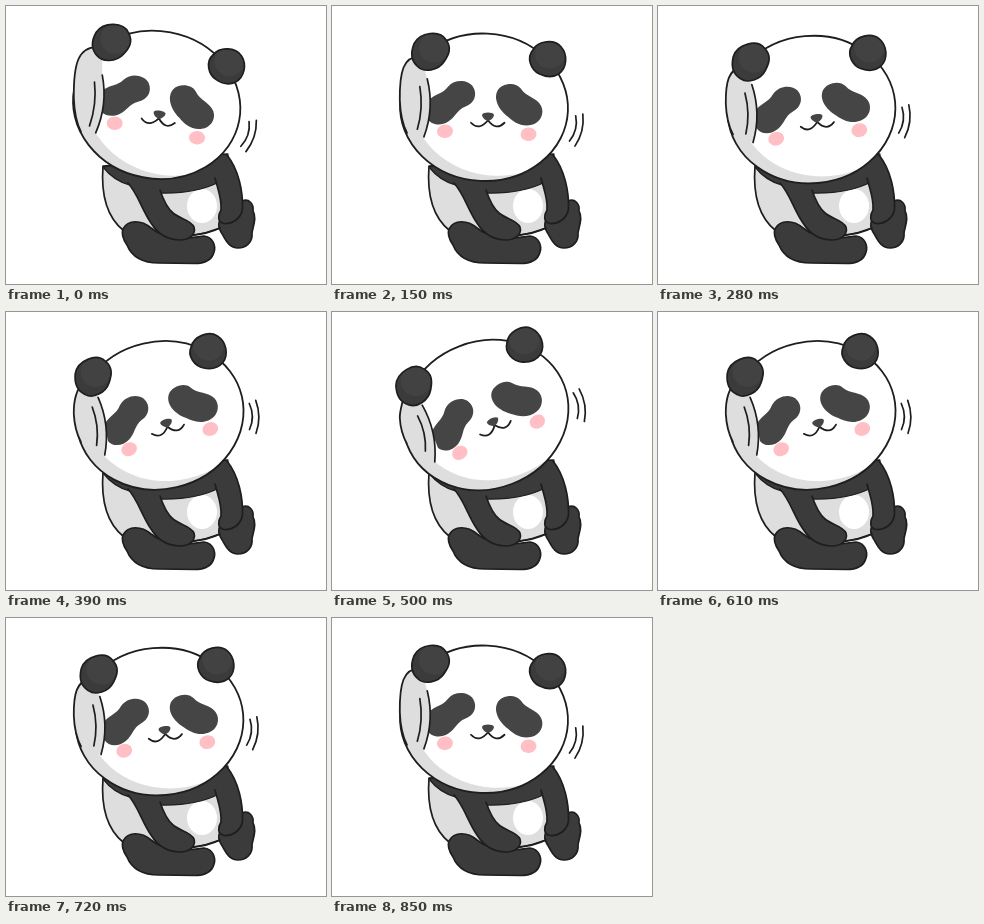
An HTML page with a canvas that plays this animation: 320 px wide and 278 px high, repeating every 1000 ms.

```html
<!DOCTYPE html>
<html lang="en">
<head>
<meta charset="utf-8">
<title>Panda</title>
<style>
  html, body { margin: 0; width: 100%; height: 100%; overflow: hidden; background: #fff; }
  canvas { display: block; width: 320px; height: 278px; }
</style>
</head>
<body>
<canvas id="stage"></canvas>
<script>
const canvas = document.getElementById('stage');
const ctx = canvas.getContext('2d');
const scale = window.devicePixelRatio || 1;
canvas.width = Math.round(320 * scale);
canvas.height = Math.round(278 * scale);

const INK = '#1e1e1e', DARK = '#3b3b3c', SHEEN = '#424243', PATCH = '#454546';
const GRAY = '#dedede', WHITE = '#fff', PINK = '#ffbfc4';
const PIVOT = { x: 160, y: 97 };
const LEFT_EAR = { x: 99, y: 44 };
const RAD = Math.PI / 180;

function paint(path, fill, line = 1.7) {
  if (fill) { ctx.fillStyle = fill; ctx.fill(path); }
  if (line) { ctx.strokeStyle = INK; ctx.lineWidth = line; ctx.stroke(path); }
}

function paintInside(shape, base, inner, color, line) {
  paint(shape, base, 0);
  ctx.save();
  ctx.clip(shape);
  paint(inner, color, 0);
  ctx.restore();
  paint(shape, null, line);
}

function oval(x, y, rx, ry, turn = 0) {
  const path = new Path2D();
  path.ellipse(x, y, rx, ry, turn, 0, Math.PI * 2);
  return path;
}

// Start, control and end of an upright bow bulging to the right, then turned.
function bowPoints(x, y, half, bulge, degrees) {
  const c = Math.cos(degrees * RAD), s = Math.sin(degrees * RAD);
  return [[0, -half], [bulge, 0], [0, half]]
    .map(([u, v]) => [x + c * u - s * v, y + s * u + c * v]);
}

function strokeBow(...shape) {
  const [from, control, to] = bowPoints(...shape);
  const path = new Path2D();
  path.moveTo(...from);
  path.quadraticCurveTo(...control, ...to);
  paint(path, null);
}

const torso = new Path2D('M97 160C95 186 99 210 118 225L150 232Q186 233 214 222L222 150Z');
const belly = oval(196, 200, 15, 17);
const chest = new Path2D('M97 161Q108 175 124 179L154 187Q190 188 213 176L222 148L160 150Z');
const rightFoot = new Path2D('M236 195C243 192 248 198 247 205C251 212 247 220 246 227C247 236 240 242 232 242C222 242 219 232 215 226C210 218 214 210 222 208Z');
const rightArm = new Path2D('M221 149C233 164 237 186 236.5 203C235 213 226 218 218 217.5C211 216 212 209 215 204C216 193 212 184 209 172');
const leftFoot = new Path2D('M117 223C122 213 136 214 145 222C158 233 180 233 198 230C207 231 210 240 208 246C206 254 198 257.500 188 257.500L153 257C134 257 125 249 121 239C117 233 115 228 117 223Z');
const leftArm = new Path2D('M122 177C132 188 136 204 145 217C152 228 162 234 174 234C184 234 190 228 188 221C185 214 174 213 167 207C160 201 157 193 154 184');
const lap = new Path2D('M186 229Q202 228 214 222');

const head = oval(152, 99.500, 84, 73.700, 0.05);
const face = oval(165, 94, 85, 74, 0.05);
const leftEar = new Path2D('M82 36C88 24 108 22 114 32C120 40 117 47 112 54C106 63 92 65 86 59C80 54 78 46 82 36Z');
const rightEar = new Path2D('M201 42C206 33 222 31 229 39C236 47 235 60 227 66C221 70 213 69 207 66C199 62 194 50 201 42Z');
const leftPatch = new Path2D('M116 79C123 71 136 72 141 79C146 87 142 96 133 99C125 102 124 109 116 114C108 119 98 117 95 110L96 93C103 86 111 86 116 79Z');
const rightPatch = new Path2D('M166 82C171 75 184 74 189 81C194 89 205 90 209 98C213 106 208 115 200 117C190 120 181 114 176 109C169 104 160 92 166 82Z');
const nose = new Path2D('M150 107C151 104 161 104 162 107C162 110 158 113 156 113C154 113 150 110 150 107Z');
const mouth = new Path2D('M139 115Q147 123.500 156 112.500Q164 123.500 172.500 115');

function drawBody() {
  paint(torso, GRAY);
  paint(belly, WHITE, 0);
  paint(chest, DARK, 1.3);
  paint(rightFoot, DARK);
  paint(rightArm, DARK);
  paint(lap, null);
  paint(leftFoot, DARK);
  paint(leftArm, DARK);
}

function drawFace() {
  paintInside(head, GRAY, face, WHITE, 1.8);
  paint(leftPatch, PATCH, 0);
  paint(rightPatch, PATCH, 0);
  paint(oval(113, 123.500, 8, 6.8, -0.15), PINK, 0);
  paint(oval(196.500, 126.500, 8, 6.8, -0.1), PINK, 0);
  paint(mouth, null, 1.8);
  paint(nose, PATCH, 0);
}

function drawEars() {
  paintInside(leftEar, DARK, oval(102, 40, 15, 15), SHEEN);
  paintInside(rightEar, DARK, oval(218, 46, 15, 15), SHEEN);
}

// The head swings about the pivot with a slight bob and sway.
function headMatrix(pose) {
  const sway = 1.2 * Math.sin((pose - 1) * Math.PI / 3);
  const bob = 0.5 + 2.5 * Math.sin(pose * Math.PI / 4) ** 2;
  return new DOMMatrix()
    .translate(PIVOT.x + sway, PIVOT.y + bob)
    .rotate(8 - 8 * pose)
    .translate(-PIVOT.x, -PIVOT.y);
}

function withMatrix(m, draw) {
  ctx.save();
  ctx.transform(m.a, m.b, m.c, m.d, m.e, m.f);
  draw();
  ctx.restore();
}

// The shaded cheek hangs from the left ear down to a bowed fold.
function drawCheek(ear, lean) {
  const x = 93 + 3.5 * lean, y = 98 + 23.5 * lean, turn = 6.5 - 19 * lean;
  const fold = [x, y, 29, 9, turn];
  const [top, control, bottom] = bowPoints(...fold);
  const side = new Path2D();
  side.moveTo(ear.x - 10, ear.y + 5);
  side.bezierCurveTo(71, ear.y + 1 + 16 * lean, 67.5, 60 + 38 * lean, 67.8, 92 + 14 * lean);
  side.quadraticCurveTo(68.5, 113 + 7 * lean, 75, 126 + 6 * lean);
  const area = new Path2D(side);
  area.lineTo(...bottom);
  area.quadraticCurveTo(...control, ...top);
  paint(area, GRAY, 0);
  paint(side, null, 1.8);
  strokeBow(...fold);
  strokeBow(x - 7, y, 29 - 7 - 4 * lean, 5, turn);
}

// Two motion lines circle the head on its right.
function drawShake(lean) {
  const angle = 18.4 - 22.5 * lean;
  for (const [radius, half] of [[88.5, 13], [95, 16.5]]) {
    const x = 155 + radius * Math.cos(angle * RAD);
    const y = 100 + radius * Math.sin(angle * RAD);
    strokeBow(x, y, half, 6, angle - 5 * lean);
  }
}

function drawPose(pose) {
  const lean = (pose / 4) ** 1.3;
  const swing = headMatrix(pose);
  ctx.setTransform(scale, 0, 0, scale, 0, 0);
  ctx.fillStyle = WHITE;
  ctx.fillRect(0, 0, 320, 278);
  ctx.lineCap = ctx.lineJoin = 'round';
  drawBody();
  withMatrix(swing, drawFace);
  drawCheek(swing.transformPoint(LEFT_EAR), lean);
  withMatrix(swing, drawEars);
  drawShake(lean);
}

// Eight held steps per second, longer towards the ends of the loop.
const hold = step => 110 + 20 * Math.max(0, Math.abs(step - 3.5) - 1.5);

function poseAt(time) {
  let step = 0;
  for (let left = time; left >= hold(step); step++) left -= hold(step);
  return 4 - Math.abs(step - 4);
}

const start = performance.now();
function frame() {
  drawPose(poseAt((performance.now() - start) % 1000));
  requestAnimationFrame(frame);
}
frame();
</script>
</body>
</html>
```
